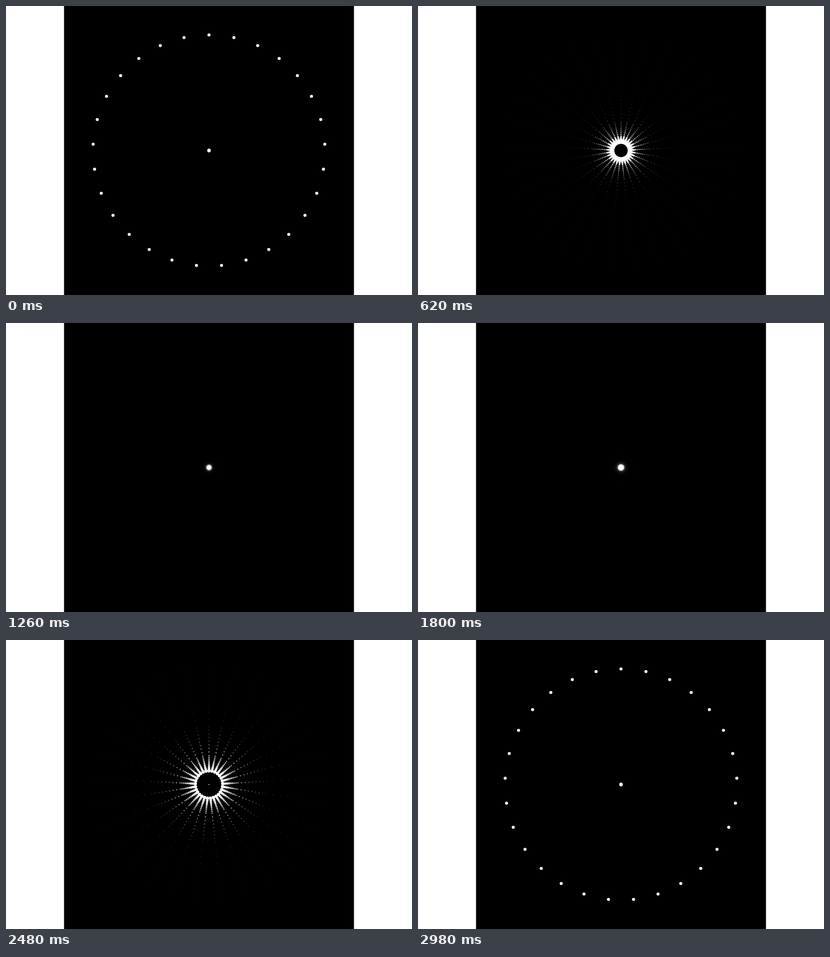
Animation of 885x632 px, one loop 3000 ms. Source, as an HTML page with a canvas:

```html
<!DOCTYPE html>
<html lang="en">
<head>
<meta charset="utf-8">
<title>Converging ring</title>
<style>
  html, body { margin: 0; width: 100%; height: 100%; overflow: hidden; background: #fff; }
  canvas { display: block; }
</style>
</head>
<body>
<canvas id="stage" width="885" height="632"></canvas>
<script>
const ctx = document.getElementById('stage').getContext('2d');

const SIZE = 632, SCALE = SIZE / 400, CX = 442.5, CY = 316;
const RAYS = 29, STEP = 20, HALF = 75, TRAIL = 40;
const START = 160, DOT = 2.1, SHRINK = 0.915, FADE = 0.945;

// Halves every 8 steps, moving evenly in between.
function ringRadius(step) {
  const octave = Math.floor(step / 8);
  return START * 2 ** -octave * (1 - (step % 8) / 16);
}

function drawRing(step, age) {
  const dist = ringRadius(step) * SCALE;
  const size = DOT * SCALE * SHRINK ** age;
  const r = Math.max(size, 0.5);
  // Dots below a pixel dim instead of shrinking further.
  ctx.globalAlpha = FADE ** age * (size / r) ** 2;
  for (let i = 0; i < RAYS; i++) {
    const a = i / RAYS * 2 * Math.PI;
    ctx.beginPath();
    ctx.arc(CX + dist * Math.sin(a), CY - dist * Math.cos(a), r, 0, 2 * Math.PI);
    ctx.fill();
  }
}

function draw(ms) {
  const frame = Math.floor(ms / STEP) % (2 * HALF);
  const step = frame < HALF ? frame : 2 * HALF - 1 - frame;
  ctx.globalAlpha = 1;
  ctx.fillStyle = '#fff';
  ctx.fillRect(0, 0, 885, SIZE);
  ctx.fillStyle = '#000';
  ctx.fillRect(CX - SIZE / 2, 0, SIZE, SIZE);
  ctx.fillStyle = '#fff';
  for (let age = TRAIL; age >= 0; age--) {
    drawRing((step - age + HALF) % HALF, age);
  }
}

const begin = performance.now();
function tick() {
  draw(performance.now() - begin);
  requestAnimationFrame(tick);
}
tick();
</script>
</body>
</html>
```
